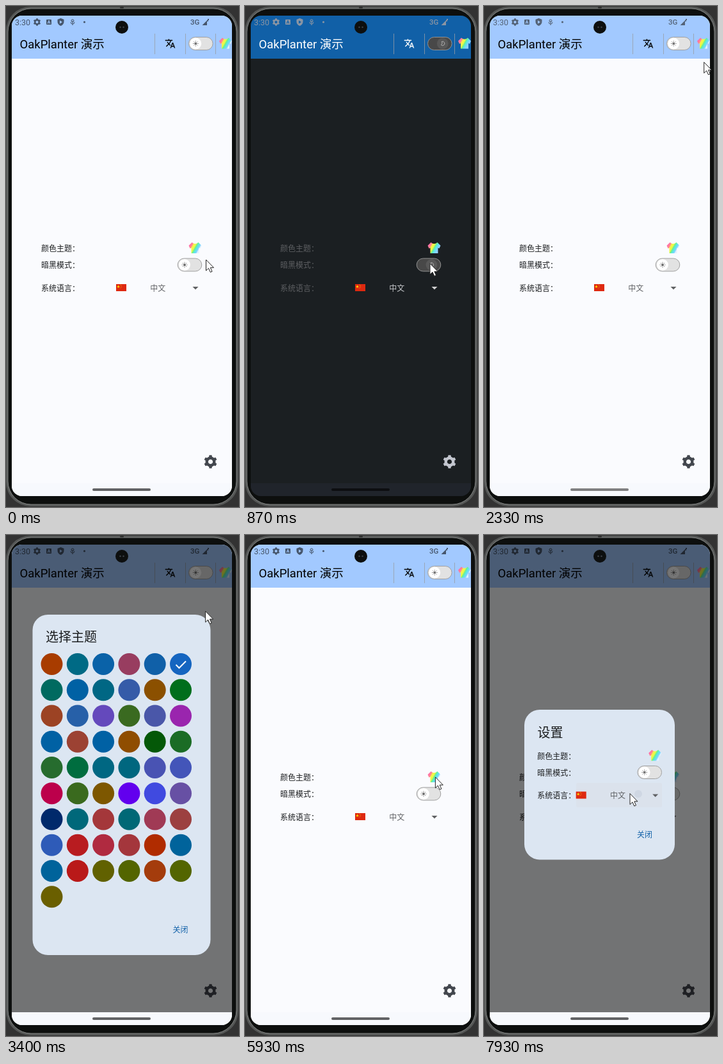
Recreate the animation shown at these times as an HTML page. Size 364 by 780 pixels, loop 8 s.

```html
<!DOCTYPE html>
<html lang="zh">
<head>
<meta charset="utf-8">
<style>
html, body { margin: 0; width: 100%; height: 100%; overflow: hidden; background: #333; }
svg { display: block; width: 100vw; height: 100vh; }
text { font-family: Roboto, "Noto Sans CJK SC", "Noto Sans CJK", sans-serif; font-size: 12px; }
.head { fill: var(--head); }
.body { fill: var(--body); }
.fg { fill: var(--fg); }
.label { fill: var(--label); }
.drop { fill: var(--drop); }
.caret { fill: var(--caret); }
.gear { color: var(--gear); }
.status { fill: var(--status); color: var(--status); }
.status text { font-size: 12.5px; }
.title { font-size: 20px; fill: #1a1c1e; }
.link { fill: #1060a8; }
.track { fill: var(--track); stroke: var(--rim); }
.thumb { fill: var(--thumb); }
.sun { opacity: var(--sun); }
.moon { opacity: var(--moon); }
.sleeve { stop-color: var(--sleeve); }
</style>
</head>
<body>
<svg id="stage" viewBox="0 0 364 780" xmlns="http://www.w3.org/2000/svg"></svg>
<script>
const LOOP = 8000;
const svg = document.getElementById('stage');

const themes = `a83c00 006a85 0a62a8 983d60 1060a8 1565c0
006a60 0061a4 006784 355ba8 8b5000 006e1c
9c4324 2760a8 6449bc 3a6a20 4a57a9 9a25ae
0061a4 9c4233 0061a4 8f4d00 045808 1b6c25
266c2e 006d3f 006782 00677f 4953b3 4355b9
bc004b 3a6a1e 7d5700 6200ee 404ae0 6750a4
00296b 00687a a4373a 006876 a03a55 9c4040
2e5bb8 b81c20 b02a40 a4363c b02c00 00639b
00639b b91919 616100 536500 a43c0c 536500
6a5f00`.split(/\s+/);

const spokes = (n, make) => Array.from({ length: n }, (_, i) => make(i * 360 / n)).join('');
const use = (id, x, y, scale = 1, cls = '') =>
  `<use href="#${id}" class="${cls}" transform="translate(${x} ${y}) scale(${scale})"/>`;
const text = (x, y, s, cls = '', extra = '') => `<text x="${x}" y="${y}" class="${cls}" ${extra}>${s}</text>`;
const rect = (x, y, w, h, r, fill, extra = '') =>
  `<rect x="${x}" y="${y}" width="${w}" height="${h}" rx="${r}" fill="${fill}" ${extra}/>`;

const defs = `<defs>
  <clipPath id="screen">${rect(9, 15, 344, 748, 16, '#000')}</clipPath>
  <linearGradient id="rainbow" gradientUnits="userSpaceOnUse" x1="-9" y1="-5" x2="9" y2="5">
    <stop offset=".06" stop-color="#ff6fa8"/><stop offset=".2" stop-color="#ff8f8a"/>
    <stop offset=".27" stop-color="#fbf04a"/><stop offset=".42" stop-color="#e6fa48"/>
    <stop offset=".5" stop-color="#6df08c"/><stop offset=".62" stop-color="#5ce6e6"/>
    <stop offset=".74" stop-color="#7fd4ff"/><stop offset=".82" class="sleeve"/>
  </linearGradient>
  <g id="shirt"><path fill="url(#rainbow)" d="M-5-8.500L-10-3.500L-8 1L-6 0V8.500H6V0L8 1L10-3.500L5-8.500Q0-4-5-8.500Z"/></g>
  <g id="cog"><circle r="5.800" fill="none" stroke="currentColor" stroke-width="4.400"/>
    ${spokes(6, a => `<path d="M-2.700-6L-2-10.200H2L2.700-6Z" fill="currentColor" transform="rotate(${a})"/>`)}</g>
  <g id="switch">
    <rect class="track" x="-18.800" y="-10" width="37.600" height="20" rx="10"/>
    <g class="knob"><circle class="thumb" r="8.900"/>
      <g class="sun" stroke="#666" stroke-width=".9"><circle r="1.600" fill="#777"/>
        ${spokes(8, a => `<path d="M0-3V-4.300" transform="rotate(${a})"/>`)}</g>
      <path class="moon" d="M-1.500-3A3.200 3.200 0 1 1-2.500 2A3.400 3.400 0 0 0-1.500-3Z" fill="none" stroke="#bbb" stroke-width=".9"/>
    </g>
  </g>
  <g id="flag">${rect(0, 0, 16, 11, 0, '#de2910')}
    <path d="M3.500 1.300L4.200 3.200H6L4.600 4.300L5.100 6L3.500 5L1.900 6L2.400 4.300L1 3.200H2.800Z" fill="#ffde00"/>
    <path d="M6.500 1h1M7.600 2.500h1M7.600 4.500h1M6.500 6h1" stroke="#ffde00" stroke-width=".6"/></g>
  <path id="translate" d="M12.87 15.070l-2.540-2.510c1.740-1.940 3-4.200 3.740-6.560H17V4h-7V2H8v2H1v2h11.170C11.500 7.920 10.440 9.750 9 11.350 8.070 10.320 7.300 9.190 6.690 8h-2c.73 1.630 1.730 3.170 2.980 4.560l-5.090 5.020L4 19l5-5 3.110 3.110zM18.500 10h-2L12 22h2l1.120-3h4.750L21 22h2zm-2.620 7l1.620-4.330L19.120 17z"/>
</defs>`;

const device = rect(0, 1, 363, 778, 38, '#565857') +
  rect(3, 4, 357, 772, 36, '#0d0f0e', 'stroke="#868887"') +
  rect(178, 1.5, 6, 2, 1, '#222');

const statusBar = `<g class="status">
  ${text(14, 30, '3:30')}
  ${use('cog', 48.500, 25, .56)}
  ${rect(63, 21, 8, 8, 1, 'currentColor')}
  <path d="M65 27.500L67 22.500L69 27.500M65.800 26H68.200" style="stroke:var(--head);fill:none"/>
  <path d="M85.500 19L90.500 21V25Q90 29 85.500 31Q81 29 80.500 25V21Z"/>
  <path d="M84 22.500V27.500L88 25Z" class="head"/>
  <g fill="none" stroke="currentColor"><circle cx="104" cy="23" r="2"/>
    <path d="M101 25Q101 28 104 28T107 25M104 23V30"/></g>
  <circle cx="122.500" cy="25" r="1.600"/>
  ${text(288, 29, '3G', '', 'style="font-size:11.5px;font-weight:500"')}
  <path d="M306.500 30L316 20.500V24H314V30ZM315 20h2v2h-2z"/>
</g>`;

const header = `<rect class="head" x="9" y="15" width="344" height="67"/>
  ${statusBar}
  ${text(21.500, 66, 'OakPlanter 演示', 'fg', 'style="font-size:18.5px"')}
  ${[232.5, 280.5, 327.5].map(x => `<path d="M${x} 43V75" stroke="#999da5" stroke-width=".8"/>`).join('')}
  ${use('translate', 248, 50, .71, 'fg')}
  ${use('switch', 304.300, 58.500)}${use('shirt', 343, 58)}`;

// The same rows serve the page and the narrower settings dialog.
const options = (inset, dy) => `<g transform="translate(${inset} ${dy})" class="label">
    ${text(55, 382, '颜色主题：')}${text(55, 408, '暗黑模式：')}${text(55, 443.700, '系统语言：')}</g>
  <g transform="translate(${-inset} ${dy})">
    ${use('shirt', 295.500, 376.500)}${use('switch', 287, 403)}${use('flag', 172, 433)}
    ${text(225.300, 443.700, '中文', 'drop')}
    <path class="caret" d="M291.500 437H300.500L296 441.500Z"/></g>`;

const swatches = themes.map((c, i) =>
  `<circle cx="${71.5 + i % 6 * 40.3}" cy="${201 + Math.floor(i / 6) * 40.25}" r="17" fill="#${c}"/>`).join('');

const themeDialog = `<g id="themeDialog">
  ${rect(41.5, 124, 278, 530, 24, '#dce6f2')}
  ${text(62, 165.500, '选择主题', 'title')}${swatches}
  <path d="M265.500 202L270.500 207L281 196.500" fill="none" stroke="#fff" stroke-width="2"/>
  ${rect(246, 597, 53, 34, 17, '#c5d8eb', 'id="closeHover"')}
  ${text(260.500, 619, '关闭', 'link')}</g>`;

const settingsDialog = `<g id="settingsDialog">
  ${rect(63, 272, 235, 233.5, 24, '#dce6f2')}
  ${text(83.500, 314.500, '设置', 'title')}
  ${rect(144, 386, 134, 38, 2, '#dbe2ec', 'id="rowHover"')}
  <circle id="ripple" cx="241" cy="403" fill="#cfd7e3"/>
  ${options(28.3, -33.5)}
  ${text(239, 470.500, '关闭', 'link')}</g>`;

svg.innerHTML = `${defs}${device}
<g clip-path="url(#screen)">
  <rect class="body" x="9" y="15" width="344" height="748"/>
  ${header}${options(0, 0)}${use('cog', 319.500, 709.500, 1, 'gear')}
  <rect id="scrim" x="9" y="15" width="344" height="728"/>
  <rect id="nav" x="9" y="743" width="344" height="20"/>
  <rect id="handle" x="135" y="751" width="91" height="4" rx="2"/>
  ${themeDialog}${settingsDialog}
</g>
<circle cx="181" cy="33" r="10" fill="#0d0f0f"/>
<circle cx="178.500" cy="33" r="1.300" fill="#3b4146"/><circle cx="183.500" cy="33" r="1.300" fill="#3b4146"/>
<path id="cursor" d="M0 0V17L4 13.300L6.800 19.500L9.500 18.300L6.800 12.300H12Z" fill="#fff" stroke="#222" stroke-width="1"/>`;

const el = id => document.getElementById(id);
const ramp = (t, a, b) => Math.min(1, Math.max(0, (t - a) / (b - a)));
const within = (t, a, b) => t >= a && t < b;
const mix = (a, b, k) => {
  const part = (c, i) => parseInt(c.slice(i, i + 2), 16);
  return `rgb(${[0, 2, 4].map(i => Math.round(part(a, i) + (part(b, i) - part(a, i)) * k))})`;
};

// time, x, y
const route = [
  [0, 312.5, 395], [70, 312.5, 395], [330, 289, 401], [1070, 289, 401], [1330, 302, 404],
  [1670, 302, 404], [1800, 310.5, 314], [2400, 348, 58], [2600, 348, 58], [3330, 311.5, 119],
  [3400, 311.5, 119], [3600, 334, 67], [3900, 160, 380], [4200, 281, 617], [4660, 281, 617],
  [5130, 255, 430], [5200, 255, 430], [5750, 297, 375], [5930, 297, 375], [6000, 324, 507],
  [6200, 350, 640], [6470, 325, 709], [6800, 325, 709], [7470, 252, 415], [7530, 252, 415],
  [7800, 228, 402.5], [LOOP, 228, 402.5]
];

function cursorAt(t) {
  const i = route.findIndex(p => p[0] > t);
  const [a, b] = [route[i - 1], route[i]];
  const k = ramp(t, a[0], b[0]);
  return [1, 2].map(n => a[n] + (b[n] - a[n]) * k);
}

function draw(t) {
  const dark = ramp(t, 600, 840) - ramp(t, 1680, 1920);
  const label = ramp(t, 830, 950) - ramp(t, 1790, 2030);
  const status = ramp(t, 600, 1330) - ramp(t, 2100, 2350);
  const handle = ramp(t, 1070, 1530) - ramp(t, 2100, 2470);
  const knob = ramp(t, 680, 925) - ramp(t, 1760, 1940);
  const thumb = ramp(t, 680, 870) - ramp(t, 1790, 1940);
  const darkMode = within(t, 670, 1700);
  const moon = within(t, 760, 1760);

  const vars = {
    head: mix('a2c9ff', '1160a7', dark),
    body: mix('fafbfe', '1b1f22', dark),
    fg: mix('000000', 'ffffff', dark),
    label: mix('1a1c1e', 'dfe1e4', label),
    drop: mix('5f6165', 'c8cacd', dark),
    caret: darkMode ? '#d0d0d0' : '#606164',
    gear: mix('43474e', 'c3c6cf', dark),
    status: mix('46566c', 'ffffff', status),
    sleeve: mix('e2f1ff', '8fd2ff', dark),
    track: darkMode ? '#484848' : '#e2e2e2',
    rim: darkMode ? '#929292' : '#a0a0a0',
    thumb: mix('ffffff', '585858', thumb),
    sun: moon ? 0 : 1,
    moon: moon ? 1 : 0
  };
  for (const name in vars) svg.style.setProperty('--' + name, vars[name]);
  for (const k of svg.querySelectorAll('.knob')) k.setAttribute('transform', `translate(${-8 + 16 * knob} 0)`);

  const themeOpen = ramp(t, 2600, 2850) - ramp(t, 4470, 4760);
  const settingsOpen = ramp(t, 6740, 6990);
  el('themeDialog').setAttribute('opacity', themeOpen);
  el('settingsDialog').setAttribute('opacity', settingsOpen);
  el('scrim').setAttribute('opacity', .54 * Math.max(themeOpen, settingsOpen));
  el('closeHover').setAttribute('opacity', ramp(t, 4180, 4330));
  el('rowHover').setAttribute('opacity', ramp(t, 7300, 7450));
  el('ripple').setAttribute('r', 6 * ramp(t, 7830, 7930));

  el('nav').setAttribute('fill', darkMode ? '#20242b' : '#f7f9fd');
  el('handle').setAttribute('fill', mix('000000', 'ebebeb', handle));
  el('handle').setAttribute('opacity', .6 + .4 * handle);
  el('cursor').setAttribute('transform', `translate(${cursorAt(t)})`);
}

const start = performance.now();
function tick() {
  draw((performance.now() - start) % LOOP);
  requestAnimationFrame(tick);
}
tick();
</script>
</body>
</html>
```
